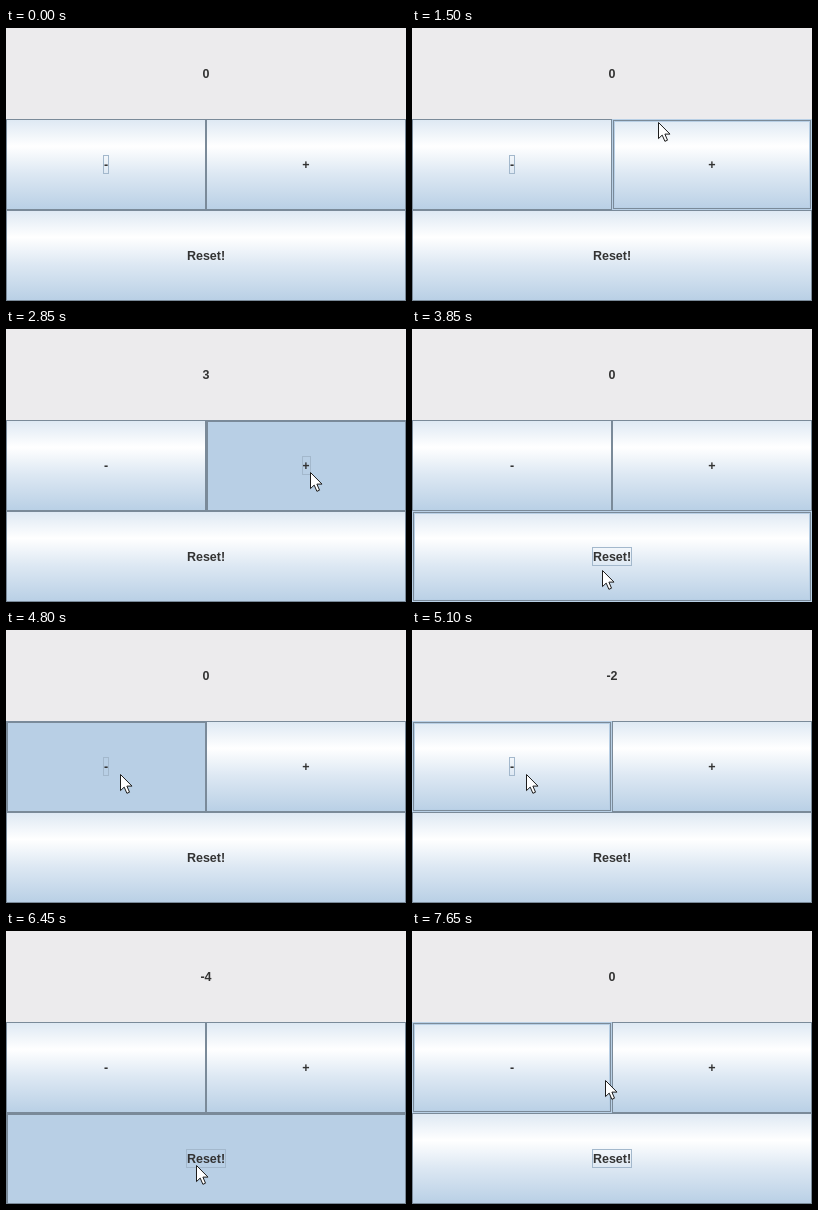
An HTML page with a canvas for the animation above (8850 ms loop, 400 by 273 pixels).

```html
<!DOCTYPE html>
<html lang="en">
<head>
<meta charset="utf-8">
<title>Counter</title>
<style>
  html, body { margin: 0; width: 100%; height: 100%; overflow: hidden; background: #ecebed; }
  canvas { display: block; width: 400px; height: 273px; }
</style>
</head>
<body>
<canvas id="stage" width="400" height="273"></canvas>
<script>
const LOOP = 8850, STEP = 50;
const DARK = '#7a8a99', BLUE = '#b8cfe5', PALE = '#dde8f3', FOCUS = '#a3b8cc', INK = '#333';
const ctx = document.getElementById('stage').getContext('2d');

const buttons = {
  minus: { x: 0, y: 91, w: 200, h: 91, text: '-', box: 5, apply: n => n - 1 },
  plus: { x: 200, y: 91, w: 200, h: 91, text: '+', box: 8, apply: n => n + 1 },
  reset: { x: 0, y: 182, w: 400, h: 91, text: 'Reset!', box: 39, apply: () => 0 }
};

// [button, press time, release time]
const clicks = [
  ['plus', 2050, 2150], ['plus', 2350, 2450], ['plus', 2550, 2650], ['plus', 2850, 2950],
  ['reset', 3750, 3850],
  ['minus', 4800, 4900], ['minus', 4950, 5050], ['minus', 5150, 5250], ['minus', 5300, 5400],
  ['reset', 6400, 6500]
];

// [start, end, x, y]: where the pointer travels to
const moves = [
  [950, 1850, 304, 143],
  [2950, 3350, 192, 242],
  [3500, 3550, 190, 241],
  [4000, 4650, 114, 144],
  [5450, 5850, 191, 247],
  [5950, 6150, 190, 234],
  [6550, 7200, 193, 149]
];

const ease = p => p * p * (3 - 2 * p);

function pointerAt(t) {
  if (t < 1000) return null;
  let x = 131, y = -3;
  for (const [start, end, toX, toY] of moves) {
    if (t <= start) break;
    const k = ease(Math.min(1, (t - start) / (end - start)));
    x += (toX - x) * k;
    y += (toY - y) * k;
  }
  return { x: Math.round(x), y: Math.round(y) };
}

function stateAt(t) {
  const state = { value: 0, focus: 'minus', pressed: null, pointer: pointerAt(t) };
  for (const [id, down, up] of clicks) {
    if (t < down) break;
    state.focus = id;
    if (t < up) state.pressed = id;
    else state.value = buttons[id].apply(state.value);
  }
  return state;
}

const contains = (b, p) => p && p.x >= b.x && p.x < b.x + b.w && p.y >= b.y && p.y < b.y + b.h;

function frame(b, inset, color) {
  ctx.strokeStyle = color;
  ctx.strokeRect(b.x + inset + 0.5, b.y + inset + 0.5, b.w - 2 * inset - 1, b.h - 2 * inset - 1);
}

function label(text, cx, cy) {
  ctx.fillStyle = INK;
  ctx.fillText(text, cx, cy + 4.5);
}

function drawButton(b, pressed, hover, focused) {
  const cx = b.x + b.w / 2, cy = b.y + b.h / 2;
  let fill = BLUE;
  if (!pressed) {
    fill = ctx.createLinearGradient(0, b.y, 0, b.y + b.h);
    fill.addColorStop(0, PALE);
    fill.addColorStop(0.3, '#fff');
    fill.addColorStop(0.6, PALE);
    fill.addColorStop(1, BLUE);
  }
  ctx.fillStyle = fill;
  ctx.fillRect(b.x, b.y, b.w, b.h);

  if (pressed) {
    frame(b, 0, DARK);
    ctx.fillStyle = DARK;
    ctx.fillRect(b.x, b.y, b.w, 2);
    ctx.fillRect(b.x, b.y, 2, b.h);
  } else if (hover) {
    frame(b, 0, BLUE);
    frame(b, 2, BLUE);
    frame(b, 1, DARK);
  } else {
    frame(b, 0, DARK);
  }

  label(b.text, cx, cy);
  if (focused) {
    ctx.strokeStyle = FOCUS;
    ctx.strokeRect(Math.floor(cx - b.box / 2) + 0.5, Math.floor(cy) - 8.5, b.box, 18);
  }
}

const arrow = new Path2D('M.5 .5V16.6L4.2 13.1L6.9 19.3L9.5 18.2L6.9 12.1H12Z');

function drawPointer(p) {
  ctx.save();
  ctx.translate(p.x, p.y);
  ctx.fillStyle = '#fff';
  ctx.strokeStyle = '#1c1c1c';
  ctx.fill(arrow);
  ctx.stroke(arrow);
  ctx.restore();
}

function draw(t) {
  const s = stateAt(t);
  ctx.fillStyle = '#ecebed';
  ctx.fillRect(0, 0, 400, 273);
  ctx.lineWidth = 1;
  ctx.font = 'bold 12.5px "Liberation Sans", Arial, sans-serif';
  ctx.textAlign = 'center';
  label(String(s.value), 200, 45.5);
  for (const [id, b] of Object.entries(buttons)) {
    drawButton(b, s.pressed === id, contains(b, s.pointer), s.focus === id);
  }
  if (s.pointer) drawPointer(s.pointer);
}

const origin = performance.now();

function tick() {
  const t = (performance.now() - origin) % LOOP;
  draw(Math.floor(t / STEP) * STEP);
  requestAnimationFrame(tick);
}
tick();
</script>
</body>
</html>
```
